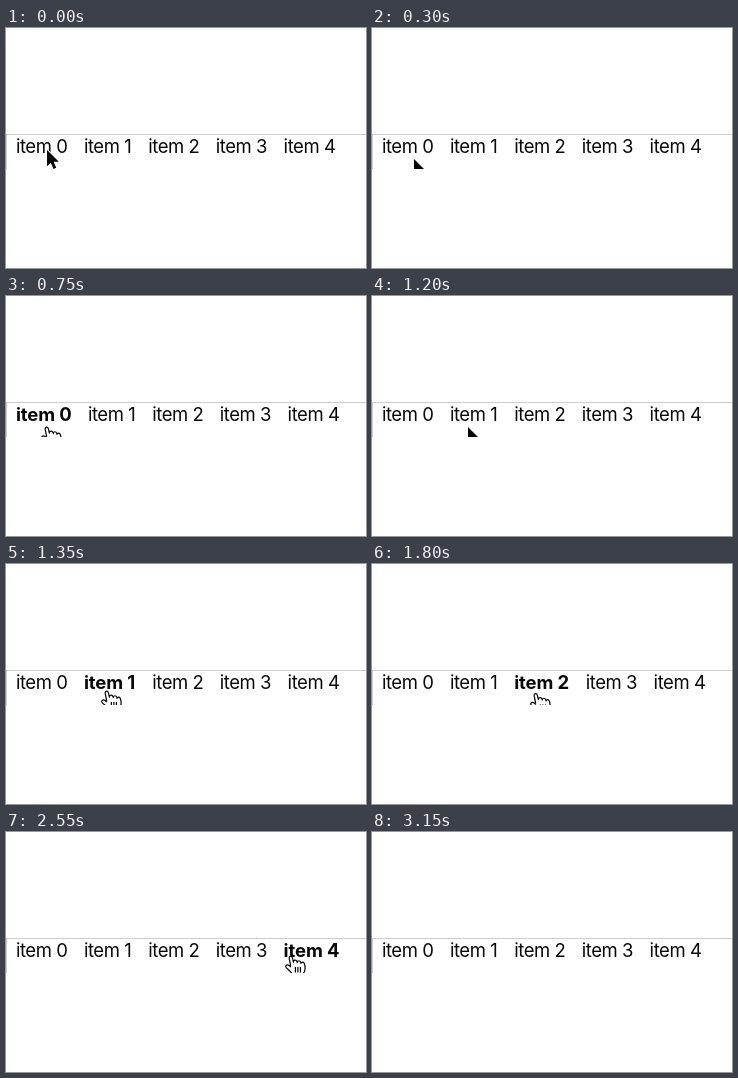
Animation of 360x240 px, one loop 3.6 s. Source, as an HTML page with a canvas:

```html
<!DOCTYPE html>
<html lang="en">
<head>
<meta charset="utf-8">
<title>Hover menu</title>
<style>
  html, body { margin: 0; width: 360px; height: 240px; overflow: hidden; background: #fff; }
  canvas { display: block; }
</style>
</head>
<body>
<canvas id="stage" width="360" height="240"></canvas>
<script>
const ctx = document.getElementById('stage').getContext('2d');
const LOOP = 3600;
const BOTTOM = 141;
const ITEM_X = [9.9, 77.9, 142.2, 209.8, 277.6];
const BOLD_SHIFT = 4;

const ARROW = new Path2D('M0 0V16.2L3.8 12.7L6.5 19L9.2 17.8L6.6 11.8H11.8Z');
const HAND = new Path2D(
  'M5.7 10.8L4.2 3.4C3.8.6 6.8.2 7.4 2.8L8.4 7.2C8.2 4.8 11.3 4.4 12 6.6L12.3 7.6' +
  'C12.4 5.2 15 5.2 15.8 7.4L16 8.4C16.4 6.6 18.8 6.8 19.4 8.8C20.6 12.4 20.6 15 18.6 18' +
  'L17.6 22.8H9L8.2 20.2C6.4 17 4 15.4 1.4 12.8C-.2 10.8 2 9 3.8 10.2L5.8 12');
const CREASES = new Path2D('M10.4 12V17.5M12.9 12V17.5M15.4 12V17.5');

// start time, cursor, position, hovered item, whether later items stay put
const STEPS = [
  { t: 0, cursor: arrow, x: 41, y: 122 },
  { t: 150, cursor: arrow, x: 40, y: 129 },
  { t: 300, cursor: arrow, x: 42, y: 131 },
  { t: 450, cursor: hand, x: 48, y: 102, hover: 0, fixed: true },
  { t: 600, cursor: arrow, x: 42, y: 134 },
  { t: 750, cursor: hand, x: 35, y: 130, hover: 0 },
  { t: 1050, cursor: hand, x: 36, y: 127, hover: 0 },
  { t: 1200, cursor: arrow, x: 96, y: 131 },
  { t: 1350, cursor: hand, x: 95, y: 126, hover: 1 },
  { t: 1650, cursor: hand, x: 116, y: 125, hover: 1 },
  { t: 1800, cursor: hand, x: 158, y: 128.5, hover: 2 },
  { t: 1950, cursor: hand, x: 158, y: 126, hover: 2 },
  { t: 2100, cursor: hand, x: 221, y: 116, hover: 3 },
  { t: 2250, cursor: hand, x: 229.5, y: 113, hover: 3 },
  { t: 2400, cursor: arrow, x: 274, y: 126 },
  { t: 2550, cursor: hand, x: 279, y: 123, hover: 4 },
  { t: 2700, cursor: hand, x: 279, y: 121, hover: 4 },
  { t: 3150 }
];

function arrow() {
  ctx.lineWidth = 2;
  ctx.strokeStyle = '#fff';
  ctx.stroke(ARROW);
  ctx.fillStyle = '#000';
  ctx.fill(ARROW);
}

function hand() {
  ctx.fillStyle = '#fff';
  ctx.fill(HAND);
  ctx.lineWidth = 1.2;
  ctx.strokeStyle = '#000';
  ctx.stroke(HAND);
  ctx.stroke(CREASES);
}

function drawItems({ hover, fixed }) {
  ctx.fillStyle = '#080808';
  ITEM_X.forEach((x, i) => {
    const bold = i === hover;
    const shift = i > hover && !fixed ? BOLD_SHIFT : 0;
    ctx.font = `${bold ? 700 : 400} 18.5px Inter, sans-serif`;
    ctx.letterSpacing = bold ? '-0.1px' : '-0.45px';
    ctx.fillText(`item ${i}`, x + shift, 125);
  });
}

function draw(time) {
  const t = time % LOOP;
  const step = STEPS.findLast(s => s.t <= t) || STEPS[0];

  ctx.fillStyle = '#fff';
  ctx.fillRect(0, 0, 360, 240);
  ctx.fillStyle = '#cecece';
  ctx.fillRect(0, 106, 360, 1);
  ctx.fillRect(0, 106, 1, BOTTOM - 106);
  drawItems(step);

  if (step.cursor) {
    ctx.save();
    ctx.beginPath();
    ctx.rect(0, 99, 360, BOTTOM - 99);
    ctx.clip();
    ctx.translate(step.x, step.y);
    ctx.lineJoin = 'round';
    step.cursor();
    ctx.restore();
  }
}

const start = performance.now();
function tick() {
  draw(performance.now() - start);
  requestAnimationFrame(tick);
}
tick();
</script>
</body>
</html>
```
